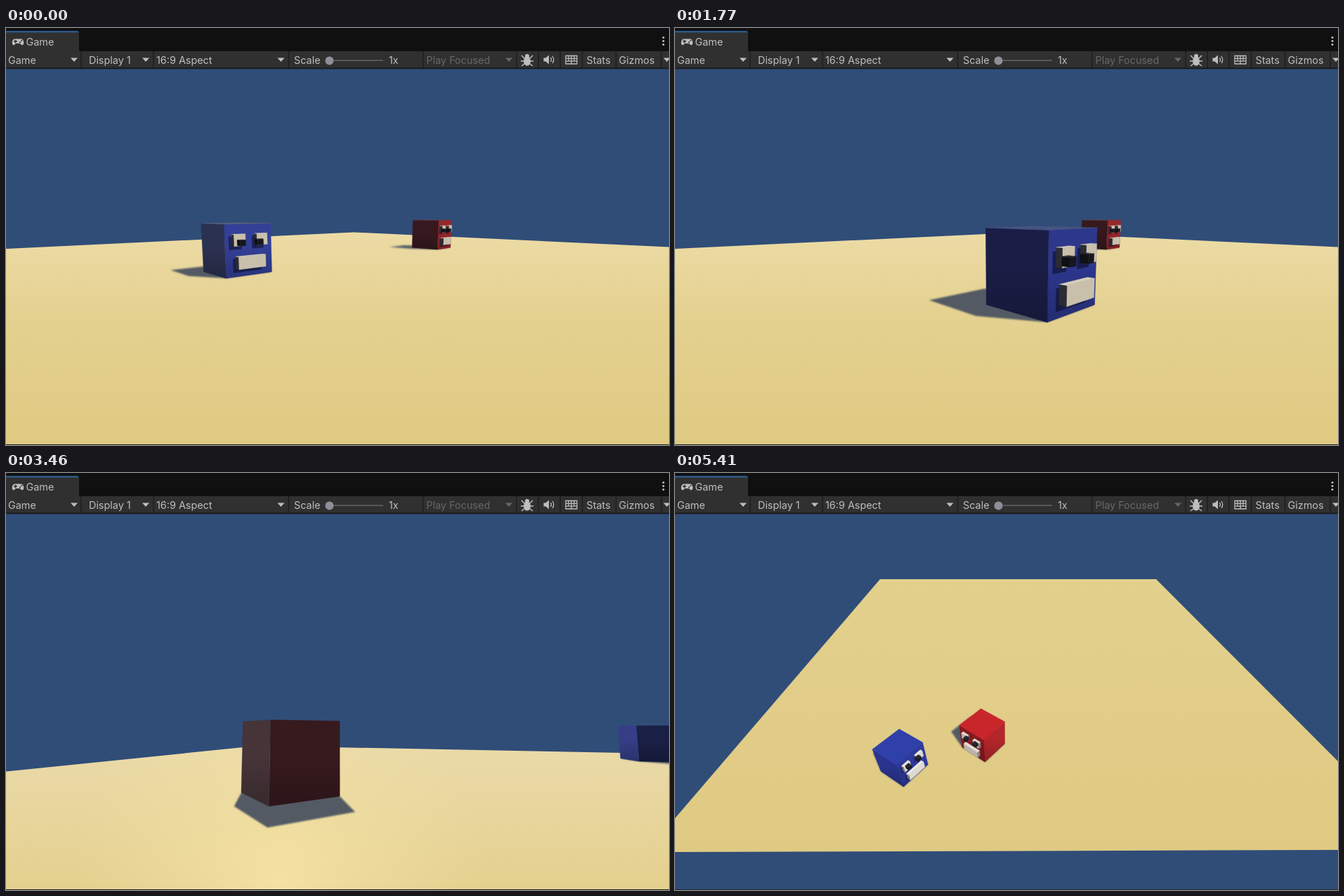
Write an HTML page that moves like this. It is 944 px wide and 593 px high and loops after 5450 ms.

```html
<!DOCTYPE html>
<html lang="en">
<head>
<meta charset="utf-8">
<title>Game view</title>
<style>
  html, body { margin: 0; width: 100%; height: 100%; overflow: hidden; background: #101010; }
  svg { display: block; width: 100vw; height: 100vh; }
  text { font: 14.4px Inter, "Open Sans", sans-serif; fill: #bebebe; }
</style>
</head>
<body>
<svg viewBox="0 0 944 593" preserveAspectRatio="none">
  <defs>
    <linearGradient id="sandA" x1="0" y1="290" x2="0" y2="592" gradientUnits="userSpaceOnUse">
      <stop offset="0" stop-color="#ecdba5"/><stop offset=".4" stop-color="#e4d190"/><stop offset="1" stop-color="#dfca82"/>
    </linearGradient>
    <linearGradient id="sandB" x1="0" y1="388" x2="0" y2="592" gradientUnits="userSpaceOnUse">
      <stop offset="0" stop-color="#eadaa9"/><stop offset="1" stop-color="#e4d08e"/>
    </linearGradient>
    <radialGradient id="glow" cx="390" cy="580" r="300" gradientUnits="userSpaceOnUse">
      <stop offset="0" stop-color="#f6e3a4" stop-opacity=".9"/><stop offset="1" stop-color="#f0dfa2" stop-opacity="0"/>
    </radialGradient>
    <linearGradient id="sandC" x1="0" y1="151" x2="0" y2="538" gradientUnits="userSpaceOnUse">
      <stop offset="0" stop-color="#e3d08d"/><stop offset="1" stop-color="#dfca83"/>
    </linearGradient>
    <linearGradient id="fade" x1="0" y1="0" x2="0" y2="1">
      <stop offset=".4" stop-color="#000" stop-opacity="0"/><stop offset="1" stop-color="#000" stop-opacity=".2"/>
    </linearGradient>
    <filter id="soft" x="-20%" y="-40%" width="140%" height="180%"><feGaussianBlur stdDeviation="1.1"/></filter>
  </defs>

  <rect y="57" width="944" height="536" fill="#304d78"/>
  <g id="world"></g>

  <rect width="944" height="33" fill="#101010"/>
  <path d="M0 4H101Q104 4 104 7V33H0Z" fill="#303030"/>
  <path d="M0 4H101Q103 4 103.5 6.4H0Z" fill="#2c5888"/>
  <rect y="33" width="944" height="24" fill="#303030"/>
  <rect y="56.5" width="944" height="1.8" fill="#191919"/>
  <rect y="592" width="944" height="1" fill="#20242a"/>
  <g id="bar"></g>
  <text x="28.5" y="25">Game</text>
  <path d="M13 15.5H21Q25 15.5 25.3 21 25 25 22 24L20 22H14L12 24Q9 25 8.7 21 9 15.5 13 15.5Z" fill="#bebebe"/>
  <path d="M11 19h5M13.5 16.7v4.8" stroke="#303030" stroke-width="1.5"/>
  <circle cx="20" cy="20.3" r="1.1" fill="#303030"/><circle cx="22.3" cy="18" r="1.1" fill="#303030"/>
  <g fill="#bebebe">
    <circle cx="936" cy="13.5" r="1.5"/><circle cx="936" cy="18.5" r="1.5"/><circle cx="936" cy="23.5" r="1.5"/>
    <rect x="466" y="45.4" width="71" height="1.6" fill="#606060"/>
    <circle cx="460.5" cy="46.5" r="6" fill="#8f8f9a"/>
    <ellipse cx="742" cy="47" rx="5" ry="6.6"/><circle cx="742" cy="40" r="3"/>
    <path d="M734 39l4 4M750 39l-4 4M733 47h18M734 54l4-3M750 54l-4-3" stroke="#bebebe" stroke-width="1.5"/>
    <path d="M765.500 42.500h3l4.500-4v13l-4.500-4h-3z"/>
  </g>
  <g fill="none" stroke="#bebebe" stroke-width="1.3">
    <path d="M775.500 42q2 3 0 6M778 40q3.500 5 0 10"/>
    <path d="M797 39.500h16v11.500h-16zM797 43.300h16M797 47.200h16M801 39.500v7.700M805 39.500v11.500M809 39.500v7.700"/>
  </g>
</svg>
<script>
const LOOP = 5450, CUT_B = 2250, CUT_C = 3980;
const FOCAL = 462, MID = 325, RAD = Math.PI / 180;
const UP = [0, 1, 0];
const world = document.getElementById('world');

// toolbar
const labels = [[3, 'Game'], [118, 'Display 1'], [214, '16:9 Aspect'], [410, 'Scale'],
  [545, '1x'], [598.5, 'Play Focused', '#676767'], [826.5, 'Stats'], [872.5, 'Gizmos']];
const arrow = (x, c) => `<path d="M${x - 5} 42.500h10l-5 5.500z" fill="${c}"/>`;
document.getElementById('bar').innerHTML =
  [107, 210, 402.5, 594, 727, 758, 789, 820.5, 868.5, 933].map(x =>
    `<rect x="${x - .6}" y="33" width="1.3" height="24" fill="#1c1c1c"/>`).join('') +
  labels.map(([x, s, c = '#bebebe']) => `<text x="${x}" y="50.500" style="fill:${c}">${s}</text>`).join('') +
  [97, 199, 391.5, 941].map(x => arrow(x, '#bebebe')).join('') + arrow(716, '#676767');

// vectors are [right, height, forward]
const add = (...vs) => vs.reduce((p, q) => p.map((n, i) => n + q[i]));
const mul = (v, k) => v.map(n => n * k);
const clamp = x => Math.max(0, Math.min(1, x));
const mix = (a, b, k) => `rgb(${a.map((n, i) => Math.round(n + (b[i] - n) * clamp(k)))})`;

const camera = (pitch, height, cx) => {
  const c = Math.cos(pitch * RAD), s = Math.sin(pitch * RAD);
  return ([x, y, z]) => {
    const h = height - y, depth = Math.max(.05, z * c + h * s);
    return [cx + FOCAL * x / depth, MID + FOCAL * (h * c - z * s) / depth];
  };
};

let view;
const str = pts => pts.map(p => p.map(n => n.toFixed(1)).join()).join(' ');
const poly = (pts, fill, attrs = '') => `<polygon points="${str(pts)}" fill="${fill}" ${attrs}/>`;
const area = pts => pts.reduce((sum, [x, y], i) => {
  const [u, v] = pts[(i + 1) % pts.length];
  return sum + x * v - u * y;
}, 0);

// colours: front, left, right, top
function box(o, a, b, c, colours, shade) {
  const oa = add(o, a), oc = add(o, c), oac = add(oa, c);
  const faces = [[o, oa, add(oa, b), add(o, b)], [oc, o, add(o, b), add(oc, b)],
    [oa, oac, add(oac, b), add(oa, b)], [add(o, b), add(oa, b), add(oac, b), add(oc, b)]];
  return faces.map((face, i) => {
    const pts = face.map(view);
    if (area(pts) >= 0) return '';
    return poly(pts, colours[i], `stroke="${colours[i]}" stroke-width=".4"`) +
      (shade && i < 2 ? poly(pts, 'url(#fade)') : '');
  }).join('');
}

function basis({ pos, yaw }) {
  const c = Math.cos(yaw * RAD), s = Math.sin(yaw * RAD);
  const r = [c, 0, s], l = [-s, 0, c];
  return { r, l, front: add([pos[0], 0, pos[1]], mul(r, -.5), mul(l, -.5)) };
}

function hull(pts) {
  const sorted = [...pts].sort((p, q) => p[0] - q[0] || p[1] - q[1]);
  const half = list => {
    const out = [];
    for (const p of list) {
      while (out.length > 1) {
        const [a, b] = out.slice(-2);
        if ((b[0] - a[0]) * (p[1] - a[1]) - (b[1] - a[1]) * (p[0] - a[0]) > 0) break;
        out.pop();
      }
      out.push(p);
    }
    return out.slice(0, -1);
  };
  return [...half(sorted), ...half(sorted.reverse())];
}

function shadow(cube, [lx, lz]) {
  const { r, l, front } = basis(cube);
  const base = [front, add(front, r), add(front, l), add(front, r, l)];
  const cast = base.map(p => add(p, [lx, 0, lz]));
  return poly(hull([...base, ...cast].map(view)), '#525a63', 'filter="url(#soft)"');
}

// parts of the face: u0, u1, v0, v1, depth, kind
const PARTS = [[.14, .38, .19, .41, .08, 0], [.62, .86, .19, .41, .08, 0],
  [.25, .37, .3, .41, .11, 1], [.62, .75, .3, .41, .11, 1], [.21, .8, .61, .85, .1, 0]];

function drawCube(cube) {
  const { r, l, front } = basis(cube);
  let out = box(front, r, UP, l, cube.colours, true);
  if (!cube.face) return out;
  const left = cube.face === 'left';
  const origin = left ? add(front, l) : front;
  const right = left ? mul(l, -1) : r, inward = left ? r : l;
  const at = (u, v, e) => add(origin, mul(right, u), mul(UP, 1 - v), mul(inward, -e));
  for (const [u0, u1, v0, v1, , dark] of PARTS) if (!dark)
    out += poly([[u0 - .06, v0 + .04], [u1 - .04, v0 + .04], [u1 - .04, v1 + .07], [u0 - .06, v1 + .07]]
      .map(([u, v]) => view(at(u, v, 0))), '#080a20', `opacity="${cube.dim}"`);
  for (const [u0, u1, v0, v1, e, dark] of PARTS)
    out += box(at(u0, v1, e), mul(right, u1 - u0), mul(UP, v1 - v0), mul(inward, e),
      dark ? ['#17181f', '#0f1016', '#17181f', '#25262e'] : cube.skin);
  return out;
}

// speeds up evenly, then cruises
const launch = (t, v, ramp) => t <= 0 ? 0 : t < ramp ? v * t * t / (2 * ramp) : v * (t - ramp / 2);

function sceneA(t) {
  const s = launch((t - 280) / 1000, 3.2, .76), k = s / 3.6;
  const skin = ['#c8c0aa', '#2b2c33', '#a9a290', '#d6cfba'];
  return {
    view: camera(7.1, 1.147, 472), light: [-.8, .23],
    ground: poly([[0, 314], [495, 290.500], [944, 311.500], [944, 592], [0, 592]], 'url(#sandA)'),
    cubes: [
      { pos: [3.45, 11.88], yaw: 45.5, face: 'right', dim: .5, skin,
        colours: ['#97282c', '#36191e', '#97282c', '#6e3a3e'] },
      { pos: [-2.07 + .707 * s, 6.64 - .707 * s], yaw: 45, face: 'right', dim: .55, skin,
        colours: [mix([51, 64, 151], [45, 55, 140], k), mix([43, 49, 80], [26, 30, 70], k),
          '#2d3686', mix([88, 96, 124], [70, 84, 128], k)] }
    ]
  };
}

function sceneB(t) {
  const u = Math.min(1, (t - 2710) / 750), s = .78 * (1 - (1 - u) ** 2);
  const yaw = 46.5 - 16.1 * (t - 2710) / 1000;
  const go = 4 * Math.max(0, (t - 3600) / 1000) ** 2;
  const turn = (46.5 - yaw) / 12;
  return {
    view: camera(-5, .88, 472), light: [.16, -.825],
    ground: [['url(#sandB)'], ['url(#glow)']].map(([f]) =>
      poly([[0, 424.500], [358, 388], [944, 399.200], [944, 592], [0, 592]], f)).join(''),
    cubes: [
      { pos: [8.886 + .305 * s, 8.834 + .9525 * s], yaw: -17.8,
        colours: ['#1a1f45', '#353e87', '#1a1f45', '#303ea8'] },
      { pos: [-.665 + go * Math.cos(yaw * RAD), 4.55 + go * Math.sin(yaw * RAD)], yaw,
        colours: ['#361a1e', mix([59, 34, 38], [70, 52, 57], turn), '#361a1e', '#4b2428'] }
    ]
  };
}

function sceneC(t) {
  const dt = (t - 4390) / 1000, brake = Math.max(0, Math.min(.58, dt - .35));
  const s = 6 * Math.min(dt, .35) + 6 * brake - 6 / .58 * brake * brake / 2;
  const yaw = 118 - 94.5 * Math.exp(-dt / 2.42);
  const k = (yaw - 23.5) / 32.5;
  return {
    view: camera(39.8, 8, 473), light: [-.46, .72],
    ground: poly([[292, 151], [685, 151], [944, 410], [944, 536], [0, 539], [0, 491]], 'url(#sandC)'),
    cubes: [
      { pos: [1.6 - .62 * s, 10.35 - .785 * s], yaw: 51.7, face: 'left', dim: .4,
        skin: ['#b8b2a9', '#55504d', '#8a8580', '#e2ddd4'],
        colours: ['#b4262b', '#861a1f', '#b4262b', '#c9262c'] },
      { pos: [-3.17, 6.4], yaw, face: 'right', dim: .3,
        skin: ['#ded9cf', '#77767c', '#a9a59e', '#ece8df'],
        colours: [mix([45, 56, 152], [46, 58, 158], k), mix([38, 48, 130], [42, 52, 142], k),
          '#2c3798', '#3040aa'] }
    ]
  };
}

function draw(t) {
  const scene = (t < CUT_B ? sceneA : t < CUT_C ? sceneB : sceneC)(t);
  view = scene.view;
  const cubes = scene.cubes.sort((a, b) => b.pos[1] - a.pos[1]);
  world.innerHTML = scene.ground + cubes.map(c => shadow(c, scene.light) + drawCube(c)).join('');
}

const start = performance.now();
function tick() {
  draw((performance.now() - start) % LOOP);
  requestAnimationFrame(tick);
}
tick();
</script>
</body>
</html>
```
